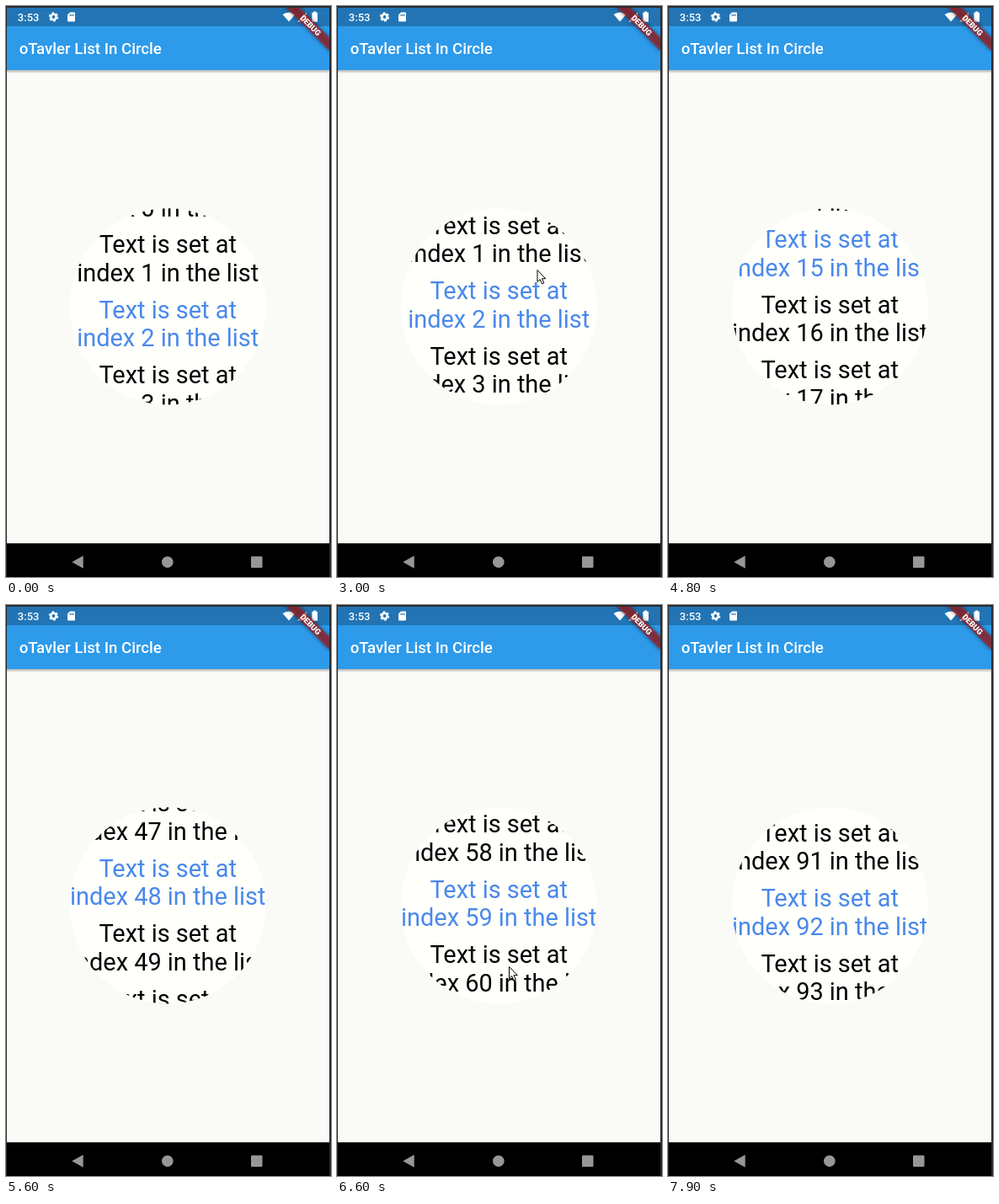
Recreate the animation shown at these times as an HTML page. Size 386 by 678 pixels, loop 8 s.

```html
<!DOCTYPE html>
<html lang="en">
<head>
<meta charset="utf-8">
<title>List in circle</title>
<style>
  html, body { margin: 0; width: 100%; height: 100%; overflow: hidden; background: #2a2b2c; }
  svg { display: block; width: 386px; height: 678px; font-family: Roboto, sans-serif; }
  #list { font-size: 28.93px; text-anchor: middle; }
</style>
</head>
<body>
<svg viewBox="0 0 386 678">
  <defs>
    <clipPath id="oval"><circle cx="192.2" cy="356.9" r="116.6"/></clipPath>
    <clipPath id="screen"><path d="M1 2H384V678H1Z"/></clipPath>
    <linearGradient id="shade" x2="0" y2="1">
      <stop stop-color="#000" stop-opacity=".3"/>
      <stop offset="1" stop-color="#000" stop-opacity="0"/>
    </linearGradient>
    <filter id="blur" x="-20%" y="-80%" width="140%" height="260%"><feGaussianBlur stdDeviation="2.8"/></filter>
  </defs>

  <g clip-path="url(#screen)">
    <path fill="#fafbf6" d="M0 0H386V678H0Z"/>
    <path fill="url(#shade)" d="M0 76H386V80H0Z"/>
    <path fill="#2d9aea" d="M0 23H386V76H0Z"/>
    <path fill="#2274b4" d="M0 0H386V24H0Z"/>
    <path d="M0 638H386V678H0Z"/>

    <g fill="#fff" font-weight="500">
      <text x="15.7" y="57" font-size="18.67">oTavler List In Circle</text>
      <text x="13.8" y="17.8" font-size="13">3:53</text>
      <circle cx="56.5" cy="13" r="3.2" fill="none" stroke="#fff" stroke-width="2.6"/>
      <circle cx="56.5" cy="13" r="4.9" fill="none" stroke="#fff" stroke-width="1.6" stroke-dasharray="2.6 2.53"/>
      <path fill-rule="evenodd" d="M76 7.5H81Q82 7.5 82 8.5V17.5Q82 18.5 81 18.5H74Q73 18.5 73 17.5V10.5ZM75.6 9.7V12H76.7V9.7ZM77.5 9.7V12H78.6V9.7ZM79.4 9.7V12H80.5V9.7Z"/>
      <path d="M328.6 10Q336 4.8 343.4 10L336 18.5Z"/>
      <path d="M357 7.5V18.5H346Z"/>
      <path d="M365.2 6.5H368.2V7.7H370V18.7H363.4V7.7H365.2Z"/>
    </g>

    <g fill="#979797">
      <path d="M78.3 660.3L91.7 652.8V667.8Z"/>
      <circle cx="191.8" cy="660.3" r="6.8"/>
      <rect x="291" y="653.5" width="13.5" height="13.5" rx="1"/>
    </g>

    <circle cx="192.2" cy="356.9" r="116.6" fill="#fffffb"/>
    <g id="list" clip-path="url(#oval)"></g>

    <g transform="translate(384.2 .6) rotate(45) scale(.9333)">
      <path d="M-40 28H40V40H-40Z" opacity=".5" filter="url(#blur)"/>
      <path d="M-40 28H40V40H-40Z" fill="#b71c1c" fill-opacity=".63"/>
      <text y="37.6" font-size="10.2" font-weight="900" fill="#fff" text-anchor="middle">DEBUG</text>
    </g>
  </g>
  <path id="cursor" fill="#fff" stroke="#000" stroke-width="1" d="M.5 .5V14.5L3.7 11.6L6 16.8L8.3 15.8L6 10.7H10.3Z"/>
</svg>
<script>
const LOOP = 8000, STEP = 100, PITCH = 77.47, LINE = 33.6, MID = 192.2, FIRST = 331.5;
const DRAGGED = 290.4, CAUGHT = 4554.6;
const list = document.getElementById('list'), cursor = document.getElementById('cursor');

const phase = (t, start, span) => Math.min(1, Math.max(0, (t - start) / span));
const easeOut = (k, power) => 1 - (1 - k) ** power;

// Friction curve of a released list
function fling(t, start, span, dist) {
  const k = phase(t, start, span);
  return dist * k * (1.2 * k * k - 3.27 * k + 3.065);
}

function scrollAt(t) {
  if (t < 2000) return 115.6 * (1 - easeOut(phase(t, 700, 300), 2));
  if (t < 4600) return DRAGGED * easeOut(phase(t, 2500, 1200), 1.2);
  if (t <= 6600) return DRAGGED + fling(t, 4622, 2400, 4366);
  return CAUGHT + fling(t, 6640, 1970, 2718);
}

// Pointer strokes; each holds its end until the next begins
const strokes = [
  { start: 800, span: 300, from: [47, 400], to: [168, 444] },
  { start: 1200, span: 100, from: [168, 444], to: [262, 481] },
  { start: 1400, span: 600, from: [262, 481], bend: [189, 515], to: [226, 445.5] },
  { start: 2500, span: 1200, from: [226, 445.5], to: [251, 157], power: 1.14 },
  { start: 3900, span: 600, from: [251, 157], to: [211, 446] },
  { start: 6000, span: 500, from: [250, 111], to: [204, 429] },
  { start: 6600, span: 100, from: [204, 429], to: [222, 213] }
];
const onStage = t => (t >= 800 && t <= 4600) || (t >= 6000 && t <= 6700);

function pointerAt(t) {
  const { start, span, from, to, bend, power = 1 } = strokes.filter(s => s.start <= t).pop();
  const k = easeOut(phase(t, start, span), power);
  return from.map((a, i) => {
    const mid = bend ? bend[i] : (a + to[i]) / 2;
    return a * (1 - k) ** 2 + 2 * mid * k * (1 - k) + to[i] * k * k;
  });
}

function draw(t) {
  const scroll = scrollAt(t);
  const active = Math.round((scrollAt(t - 16) + 19) / PITCH); // highlight trails by one refresh
  const top = Math.max(0, Math.floor((scroll - 140) / PITCH));
  let rows = '';
  for (let i = top; i < top + 6; i++) {
    const y = FIRST + i * PITCH - scroll;
    rows += `<g fill="${i === active ? '#4a88ec' : '#000'}"><text x="${MID}" y="${y}">Text is set at</text>` +
      `<text x="${MID}" y="${y + LINE}">index ${i} in the list</text></g>`;
  }
  list.innerHTML = rows;
  cursor.style.display = onStage(t) ? '' : 'none';
  if (onStage(t)) cursor.setAttribute('transform', `translate(${pointerAt(t)})`);
}

let last = -1;
function tick() {
  const t = Math.floor(performance.now() % LOOP / STEP) * STEP;
  if (t !== last) draw(last = t);
  requestAnimationFrame(tick);
}
tick();
</script>
</body>
</html>
```
